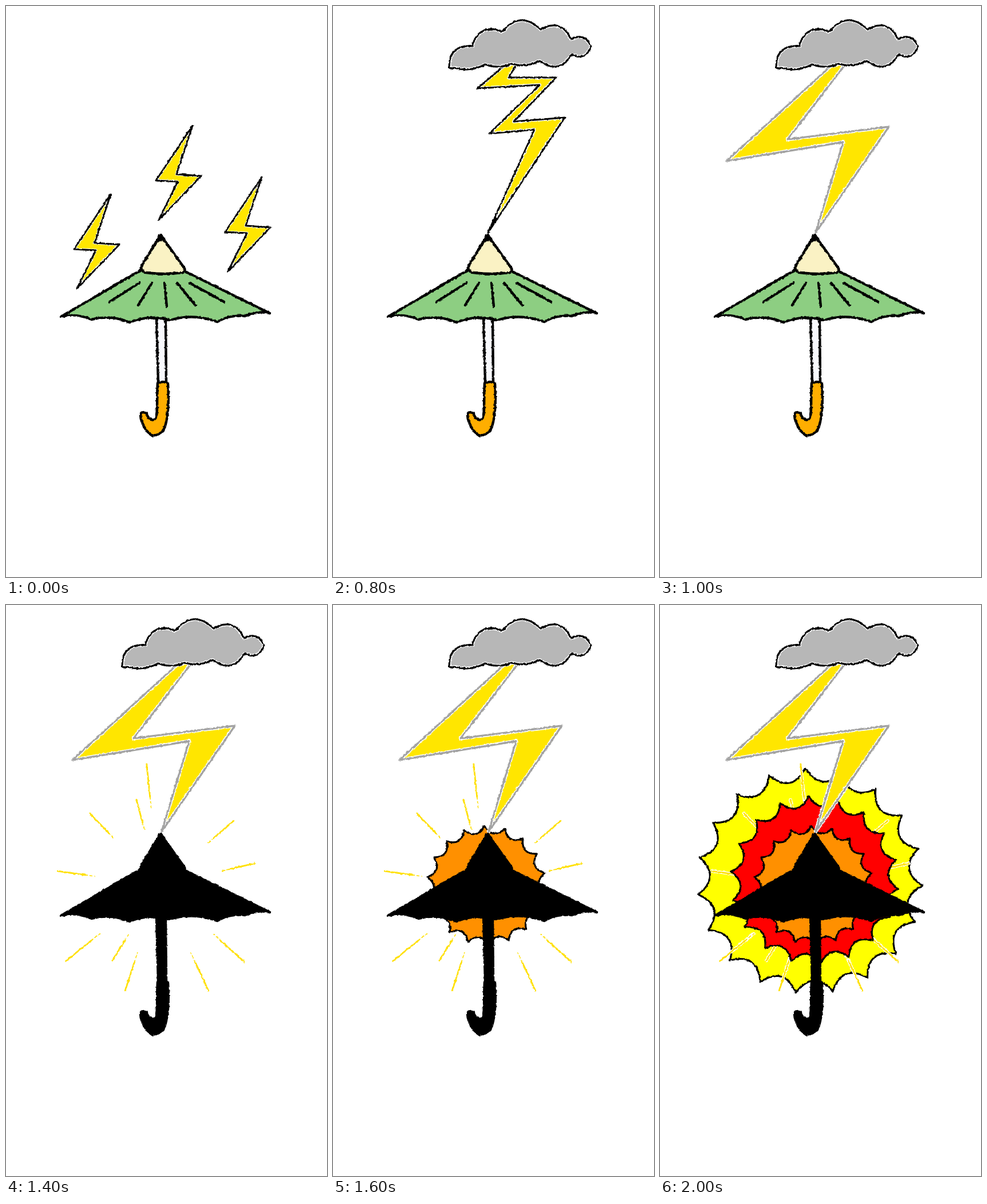
An HTML page that plays this animation: 561 px wide and 998 px high, repeating every 2.2 s.

```html
<!DOCTYPE html>
<html lang="en">
<head>
<meta charset="utf-8">
<title>Umbrella and lightning</title>
<style>
  html, body { margin: 0; width: 100%; height: 100%; overflow: hidden; background: #fff; }
  svg { display: block; width: 100%; height: 100%; }
  path { stroke-linejoin: round; stroke-linecap: round; }
  #umbrella path { stroke: #000; stroke-width: 4.4; }
  #umbrella.burnt path { fill: #000; }
</style>
</head>
<body>
<svg viewBox="0 0 561 998" preserveAspectRatio="none">
  <defs>
    <filter id="rough" x="0" y="0" width="561" height="998" filterUnits="userSpaceOnUse" color-interpolation-filters="sRGB">
      <feTurbulence type="fractalNoise" baseFrequency=".22" numOctaves="2" seed="4" result="noise"/>
      <feDisplacementMap in="SourceGraphic" in2="noise" scale="3.6" xChannelSelector="R" yChannelSelector="G"/>
    </filter>
  </defs>
  <g filter="url(#rough)">
    <g id="yellow"></g>
    <g id="rays"></g>
    <g id="red"></g>
    <g id="orange"></g>
    <g id="drizzle"></g>
    <g id="shower"></g>
    <g id="zigzag"></g>
    <g id="strike"></g>
    <g id="cloud"></g>
    <g id="umbrella"></g>
  </g>
</svg>
<script>
const LOOP = 2200;
const BOLT = '#ffe600';
const $ = id => document.getElementById(id);
const put = (id, parts) => { $(id).innerHTML = [].concat(parts).join(''); };

const path = (d, fill, ink, width, extra = '') =>
  `<path d="${d}" fill="${fill}" stroke="${ink}" stroke-width="${width}" ${extra}/>`;
const poly = pts => 'M' + pts.join('L') + 'Z';

// Chain of curves between points; positive sag bends to the right of travel.
const edge = (pts, sag) => pts.slice(1).map(([x, y], i) => {
  const [px, py] = pts[i];
  const cx = (px + x) / 2 - sag * (y - py);
  const cy = (py + y) / 2 + sag * (x - px);
  return `Q${cx} ${cy} ${x} ${y}`;
}).join('');

const polar = (cx, cy, r, degrees) => {
  const a = degrees * Math.PI / 180;
  return [cx + r * Math.cos(a), cy + r * Math.sin(a)];
};

// Filled shape with a thin white gap between fill and outline.
const inked = (d, fill, ink = '#000', width = 3, gap = 6) =>
  path(d, fill, '#fff', gap) + path(d, 'none', ink, width);

function smallBolt([x, y]) {
  const shape = [[0, 0], [-28, 85], [15, 88], [-59, 165], [-26, 98], [-64, 96]];
  return inked(poly(shape.map(([a, b]) => [x + a, y + b])), BOLT, '#000', 3, 5);
}

function burst(cx, cy, r, count, phase, fill) {
  const spikes = Array.from({ length: count + 1 }, (_, i) =>
    polar(cx, cy, r, phase + i * 360 / count));
  return path('M' + spikes[0] + edge(spikes, .6), fill, '#000', 3.2);
}

// Spark pointing at the canopy, breaking up towards its inner end.
function ray([angle, reach]) {
  const at = k => polar(268, 490, reach * k, angle);
  const line = (a, b, ink, width, extra) =>
    path(`M${at(a)}L${at(b)}`, 'none', ink, width, extra);
  return line(1, .64, '#fff', 5.5) +
    line(1, .73, '#ffe000', 2.8) +
    line(.73, .64, '#ffe000', 1.6, 'stroke-dasharray="4 4"');
}

put('drizzle', [[326, 209], [183, 329], [447, 299]].map(smallBolt));
put('shower', [[223, 177], [232, 302], [341, 243], [453, 123]].map(smallBolt));

put('zigzag', [
  inked(poly([
    [308, 97], [252, 144], [361, 138], [273, 223], [352, 216], [271, 396],
    [405, 195], [316, 202], [390, 125], [307, 125], [324, 97]
  ]), BOLT),
  path('M272 394L284 371', 'none', '#000', 4)
]);

put('strike', inked(poly([
  [307, 97], [116, 271], [320, 238], [272, 396], [400, 211], [223, 233], [328, 97]
]), BOLT, '#a3a3a3', 3.4, 6.5));

const puffs = [[203, 108], [243, 70], [296, 45], [363, 41], [416, 58], [451, 71], [417, 85], [361, 96]];
const base = [[361, 96], [312, 101], [266, 102], [212, 108], [203, 108]];
put('cloud', inked('M' + puffs[0] + edge(puffs, -.54) + edge(base, -.2) + 'Z', '#b7b7b7', '#000', 3.2));

put('yellow', burst(262, 482, 197, 19, 173, '#ff0'));
put('red', burst(270, 481, 147, 18, 6, '#f00'));
put('orange', burst(268, 490, 104, 18, 8, '#ff9000'));

put('rays', [
  [264, 213], [255, 155], [226, 175], [188, 179], [319, 172], [347, 171],
  [141, 210], [122, 155], [108, 193], [65, 203], [42, 200]
].map(ray));

const hem = [[461, 537], [418, 542], [369, 552], [287, 549], [216, 553], [149, 548], [96, 543]];
const ribs = [-2, -1, 0, 1, 2].map(i =>
  `M${277 + 22 * i} 484L${281 + 50 * i} ${525 - 2 * i * i}`).join('');
put('umbrella', [
  path('M263 546L266 658H280L279 546Z', '#f8f9fd'),
  path('M265 659Q274 655 283 659C285 690 284 715 278 735C273 748 262 752 254 750' +
    'C243 742 236 728 235 715C236 708 243 709 246 714C250 723 257 726 261 721' +
    'C266 714 263 690 265 659Z', '#ffae00'),
  path('M96 543L237 461L313 464L461 537' + edge(hem, .17) + 'Z', '#8dce82'),
  path(ribs, 'none'),
  path('M270 400L236 456Q238 466 245 466Q275 470 309 466Q315 463 311 457Z', '#faf2c4'),
  path('M270 399L264 409H277Z', '#000')
]);

// When each layer is visible, in ms.
const spans = {
  drizzle: [0, 200],
  shower: [200, 800],
  zigzag: [800, 1000],
  cloud: [800, LOOP],
  strike: [1000, LOOP],
  rays: [1200, LOOP],
  orange: [1600, LOOP],
  red: [1800, LOOP],
  yellow: [2000, LOOP]
};
const burntAt = 1400;
const start = performance.now();

function draw() {
  const t = (performance.now() - start) % LOOP;
  for (const id in spans) {
    const [from, to] = spans[id];
    $(id).style.display = t >= from && t < to ? '' : 'none';
  }
  $('umbrella').classList.toggle('burnt', t >= burntAt);
  requestAnimationFrame(draw);
}
draw();
</script>
</body>
</html>
```
